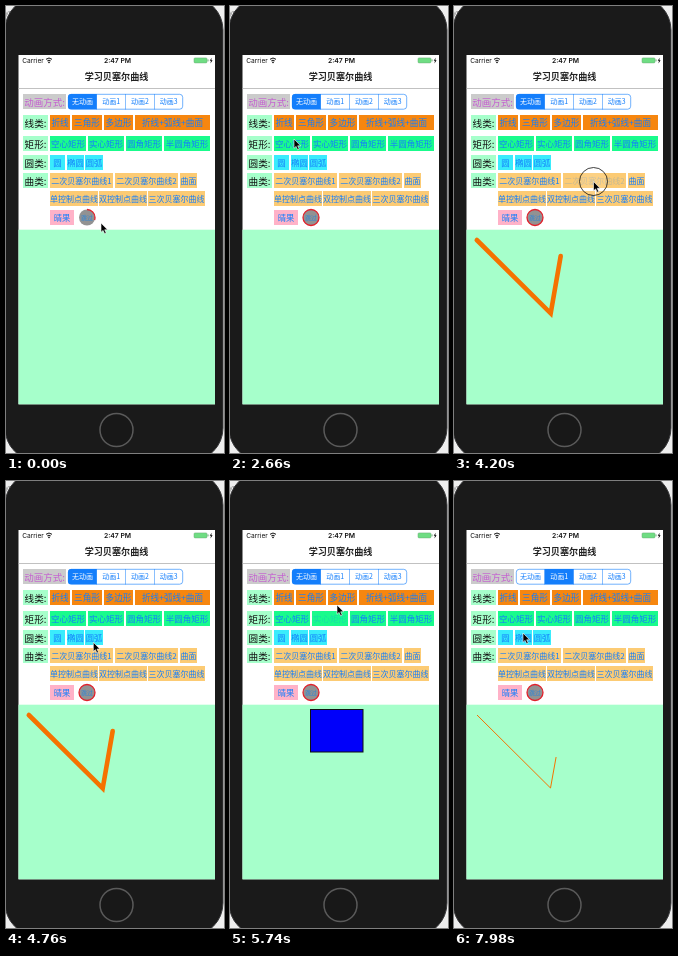
An HTML page for the animation above (8 s loop, 218 by 447 pixels).

```html
<!DOCTYPE html>
<html lang="zh">
<head>
<meta charset="utf-8">
<style>
html, body { margin: 0; width: 100%; height: 100%; overflow: hidden; background: #eee; }
svg { display: block; width: 218px; height: 447px; }
text { font-family: "Noto Sans CJK SC", "Noto Sans CJK", "Noto Sans", sans-serif; text-anchor: middle; }
text.latin { font-family: Inter, "Liberation Sans", sans-serif; }
</style>
</head>
<body>
<svg id="stage" viewBox="0 0 218 447"></svg>
<script>
const stage = document.getElementById('stage');
const BLUE = '#147efb', MINT = '#a6ffcb', ORANGE = '#f57200', GOLD = '#fccb74';

const rect = (x, y, w, h, fill, extra = '') =>
  `<rect x="${x}" y="${y}" width="${w}" height="${h}" fill="${fill}" ${extra}/>`;
const text = (s, x, y, size, fill, extra = '') =>
  `<text x="${x}" y="${y + size * 0.38}" font-size="${size}" fill="${fill}" ${extra}>${s}</text>`;
const box = (s, x, y, w, h, bg, size, fill, id = '') =>
  rect(x, y, w, h, bg) + text(s, x + w / 2, y + h / 2 + 0.4, size, fill, id && `id="${id}"`);

// Each row: top, height, colour, text size, buttons as [label, x, width, id]
const rows = [
  [109, 15, '#f6860f', 8.6, [['折线', 44, 20, 'fold'], ['三角形', 66, 30], ['多边形', 98, 29, 'poly'], ['折线+弧线+曲面', 129, 75]]],
  [130, 15, '#19fb8c', 8.5, [['空心矩形', 44, 36], ['实心矩形', 82, 36, 'solid'], ['圆角矩形', 120, 36], ['半圆角矩形', 158, 46]]],
  [149, 15, '#3aecfc', 8.3, [['圆', 44, 15], ['椭圆', 61, 17, 'oval'], ['圆弧', 79, 18]]],
  [167, 15, GOLD, 8, [['二次贝塞尔曲线1', 44, 63], ['二次贝塞尔曲线2', 109, 63, 'quad'], ['曲面', 174, 17]]],
  [185, 15, GOLD, 8, [['单控制点曲线', 44, 48], ['双控制点曲线', 93, 48], ['三次贝塞尔曲线', 142, 57]]],
  [204, 15, '#ffb2c8', 8.3, [['晴果', 44, 24]]]
];
const modes = ['无动画', '动画1', '动画2', '动画3'];
const modeX = i => 62 + i * 28.75;

stage.innerHTML =
  text('yp', 3, 6, 7, '#888', 'class="latin"') +
  rect(-1, -9, 218, 464, '#1a1a1a', 'rx="33" stroke="#39393b"') +
  '<circle cx="110.5" cy="424" r="16.5" fill="#181818" stroke="#5a5a5a" stroke-width="1.5"/>' +
  rect(12.5, 49, 196.5, 349.3, '#fff') +
  rect(12.5, 223.7, 196.5, 174.6, MINT) +
  // Status and title bars
  text('Carrier', 27, 54.2, 6.6, '#111', 'class="latin"') +
  '<g fill="none" stroke="#111"><path d="M40 53.3q3-2.6 6 0M41.3 54.9q1.7-1.4 3.4 0"/></g><circle cx="43" cy="56.4" r=".8"/>' +
  text('2:47 PM', 111.5, 54.2, 6.8, '#111', 'class="latin" font-weight="600"') +
  rect(188, 51.9, 13, 5, '#6fdd83', 'rx="1" stroke="#69ad75" stroke-width=".5"') +
  rect(201.5, 53.4, 1, 2, '#69ad75') +
  '<path d="M205.7 51.8l-2 3h1.3l-.6 2.7 2.2-3.3h-1.3z"/>' +
  text('学习贝塞尔曲线', 110.5, 70.8, 9.1, '#222', 'font-weight="700"') +
  rect(12.5, 82, 196.5, 0.8, '#b2b2b2') +
  // Mode switch
  box('动画方式:', 17, 88, 43, 15, '#cbcbcb', 9.5, '#c45fd0') +
  '<clipPath id="round"><rect x="62" y="88" width="115" height="15.5" rx="3"/></clipPath><g clip-path="url(#round)">' +
  modes.map((m, i) => rect(modeX(i), 88, 28.75, 15.5, BLUE, `id="bg${i}" opacity="0"`)).join('') + '</g>' +
  rect(62.3, 88.3, 114.4, 14.9, 'none', `rx="3" stroke="${BLUE}" stroke-width=".6"`) +
  modes.map((m, i) =>
    (i ? rect(modeX(i) - 0.25, 88, 0.5, 15.5, BLUE) : '') +
    text(m, modeX(i) + 14.4, 95.8, 7, BLUE, `id="mode${i}"`)).join('') +
  // Buttons
  ['线类:', '矩形:', '圆类:', '曲类:'].map((s, i) =>
    box(s, 17, rows[i][0], 25, rows[i][1], MINT, 9.6, '#111')).join('') +
  rows.map(([y, h, bg, size, items]) => items.map(([s, x, w, id]) =>
    box(s, x, y, w, h, bg, size, BLUE, id)).join('')).join('') +
  '<circle cx="81" cy="211.5" r="8" fill="#929292"/>' +
  text('跳过', 81, 211.5, 5.8, '#2b86d8') +
  '<circle id="ring" cx="81" cy="211.5" r="8" fill="none" stroke="#e3202b" stroke-width="1.3" pathLength="1" transform="rotate(-90 81 211.5)"/>' +
  // Drawings
  `<g fill="none" stroke="${ORANGE}">
    <path id="thick" d="M22.8 234L96.7 307.3L106.7 250" stroke-width="4.6" stroke-linecap="round"/>
    <path id="thin" d="M23 234L96.5 307L107 249" pathLength="1"/>
    <path id="pentagon" d="M117.5 276L170 296.8L149.5 349.3H86L65 296.8Z" stroke-width=".9"/>
    <ellipse id="ellipse" cx="117.5" cy="302" rx="79" ry="52.5" stroke="#e51c10"/>
  </g>` +
  rect(80.5, 228.5, 52.5, 42.5, '#0000fa', 'id="block" stroke="#111" stroke-width="1"') +
  // Pointer
  `<g id="pointer">
    <circle id="touch" r="14" fill="#fff" fill-opacity=".12" stroke="#111" stroke-width=".8"/>
    <path d="M0 0V9.3L2.1 7.4L3.6 10.8L5.2 10.1L3.7 6.8H6.6Z" fill="#000" stroke="#fff" stroke-width=".6"/>
  </g>`;

const el = id => document.getElementById(id);
const show = (id, on) => el(id).setAttribute('visibility', on ? 'visible' : 'hidden');
const clamp = v => Math.max(0, Math.min(1, v));
const ease = v => v * v * (3 - 2 * v);

const path = [
  [0, 95, 217], [1300, 95, 217], [2100, 66, 145], [2380, 66, 145], [2660, 64, 133],
  [2950, 55, 116], [3250, 55, 116], [4080, 139.5, 175.5], [4300, 139.5, 175.5],
  [5000, 68, 156], [5160, 68, 156], [5320, 86, 146], [5430, 98, 137], [5580, 98, 137],
  [5740, 107, 124], [5880, 112, 117], [6040, 112, 117], [6280, 104, 97], [6430, 104, 97],
  [6580, 90, 111], [6950, 55, 116], [7250, 55, 116], [7980, 69, 152], [8000, 69, 152]
];
const presses = [
  [3000, 'fold'], [4150, 'quad'], [5050, 'oval'], [5450, 'solid'],
  [5900, 'poly'], [6300, ''], [7020, 'fold']
];
// Visible spans of the drawings
const spans = {
  thick: [3120, 5170], ellipse: [5170, 5570], block: [5570, 6020],
  pentagon: [6020, 7140], thin: [7140, 8000]
};

function pointerAt(t) {
  const i = path.findIndex(p => p[0] > t);
  const [t0, x0, y0] = path[i - 1], [t1, x1, y1] = path[i];
  const k = ease((t - t0) / (t1 - t0));
  return [x0 + (x1 - x0) * k, y0 + (y1 - y0) * k];
}

function draw(t) {
  el('pointer').setAttribute('transform', `translate(${pointerAt(t)})`);
  show('touch', presses.some(([p]) => t >= p && t < p + 150));
  for (const [, id] of presses) {
    if (!id) continue;
    const pressed = presses.some(([p, name]) => name === id && t >= p && t < p + 350);
    el(id).setAttribute('opacity', pressed ? 0.25 : 1);
  }
  for (const id in spans) show(id, t >= spans[id][0] && t < spans[id][1]);
  el('thin').setAttribute('stroke-dasharray', `${clamp((t - 7150) / 1000)} 2`);
  el('ring').setAttribute('stroke-dasharray', `${clamp(0.3 + t / 1600)} 2`);

  // The new segment fills faster than the old one clears
  const fade = clamp((t - 6400) / 290);
  [1 - fade, Math.sqrt(fade)].forEach((on, i) => {
    const white = ease(on);
    el('bg' + i).setAttribute('opacity', on);
    el('mode' + i).setAttribute('fill', `rgb(${20 + 235 * white},${126 + 129 * white},${251 + 4 * white})`);
  });
}

const start = performance.now();
(function frame() {
  draw((performance.now() - start) % 8000);
  requestAnimationFrame(frame);
})();
</script>
</body>
</html>
```
